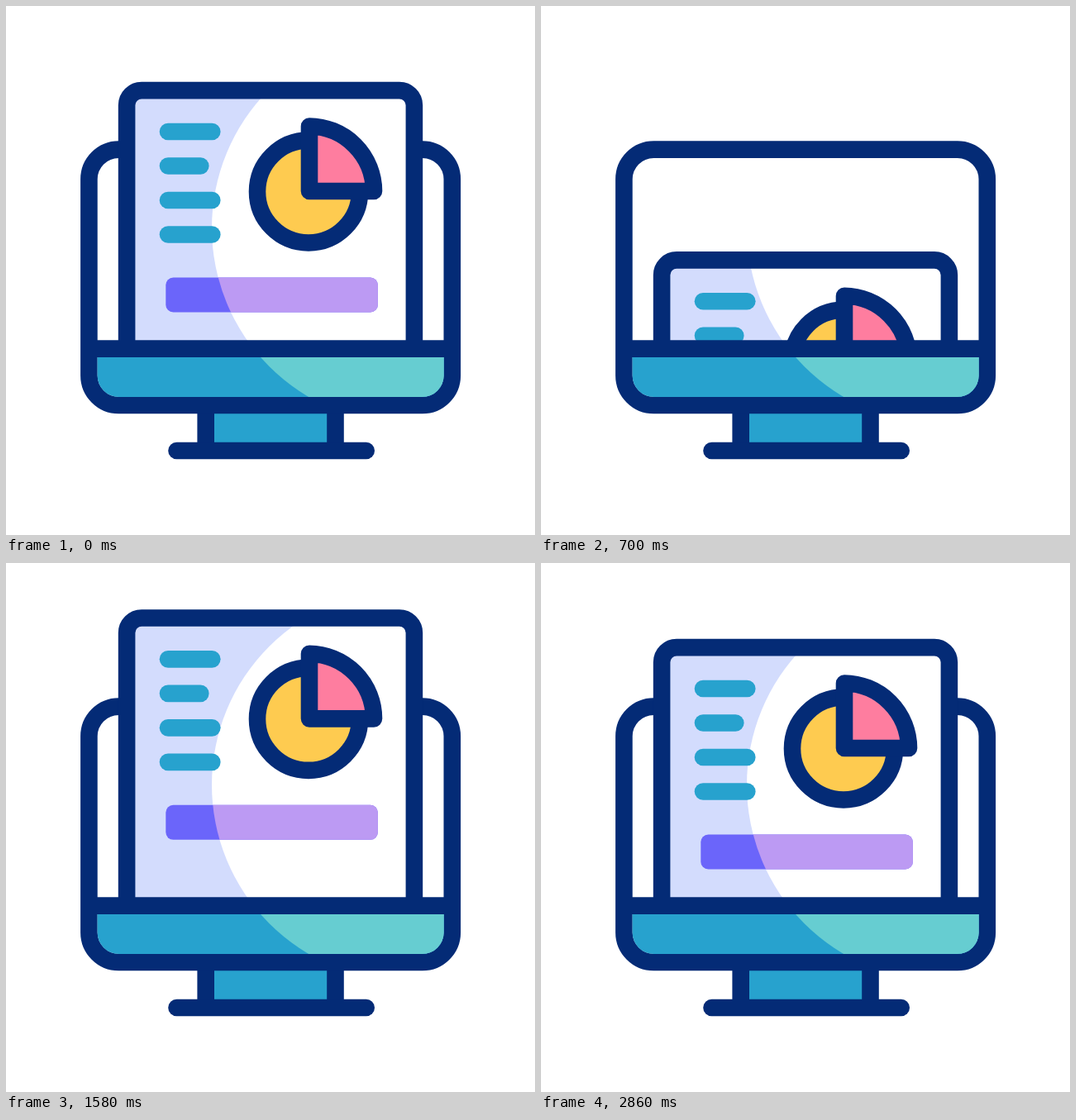
An HTML page with a canvas for the animation above (3240 ms loop, 640 by 640 pixels).

```html
<!DOCTYPE html>
<html lang="en">
<head>
<meta charset="utf-8">
<title>Report on a screen</title>
<style>
  html, body { margin: 0; width: 100%; height: 100%; overflow: hidden; background: #fff; }
  canvas { display: block; }
</style>
</head>
<body>
<canvas id="stage" width="640" height="640"></canvas>
<script>
const ctx = document.getElementById('stage').getContext('2d');
const LOOP = 3240;
const NAVY = '#042b76', TEAL = '#27a2ce', YELLOW = '#fecb50';
const PINK_RGB = [254, 125, 159], TEAL_RGB = [39, 162, 206];
const STROKE = 20.6;

// Eased value at time t; keys are [time, value] pairs
function track(t, keys) {
  if (t <= keys[0][0]) return keys[0][1];
  for (let i = 1; i < keys.length; i++) {
    const [t0, v0] = keys[i - 1], [t1, v1] = keys[i];
    if (t < t1) {
      const u = (t - t0) / (t1 - t0);
      return v0 + (v1 - v0) * u * u * (3 - 2 * u);
    }
  }
  return keys[keys.length - 1][1];
}

function box(x, y, w, h, radii) {
  const path = new Path2D();
  path.roundRect(x, y, w, h, radii);
  return path;
}

const glow = new Path2D();
glow.arc(486, 268.5, 237, 0, 2 * Math.PI);

// Fills a shape in two tones, split by the fixed glow circle
function fillSplit(path, dark, light) {
  ctx.fillStyle = dark;
  ctx.fill(path);
  ctx.save();
  ctx.clip(path);
  ctx.fillStyle = light;
  ctx.fill(glow);
  ctx.restore();
}

function outline(path, fill) {
  if (fill) {
    ctx.fillStyle = fill;
    ctx.fill(path);
  }
  ctx.strokeStyle = NAVY;
  ctx.stroke(path);
}

function line(x1, y1, x2, y2, color, cap = 'round') {
  ctx.lineCap = cap;
  ctx.strokeStyle = color;
  ctx.beginPath();
  ctx.moveTo(x1, y1);
  ctx.lineTo(x2, y2);
  ctx.stroke();
}

// y, right end, extra length of each text line
const textLines = [
  [152, 249.3, 23], [193.5, 235.3, 26.5], [235, 249.3, 16.5], [276.5, 249.3, 35]
];

function drawPie(t, dy) {
  const disc = new Path2D();
  disc.arc(366, 224.5 + dy, 62, 0, 2 * Math.PI);
  outline(disc, YELLOW);

  const mix = track(t, [[1580, 0], [1760, 1], [2480, 1], [2860, 0]]);
  const rgb = PINK_RGB.map((c, i) => Math.round(c + (TEAL_RGB[i] - c) * mix));
  const slice = new Path2D(
    `M367 ${224 + dy}V${145.5 + dy}A78.5 78.5 0 0 1 445 ${224 + dy}Z`);
  outline(slice, `rgb(${rgb})`);
}

function drawPage(t) {
  const dy = track(t, [
    [220, 0], [397, -39], [883, 318], [1616, -38], [1785, 10], [1940, 0]
  ]);
  ctx.save();
  ctx.beginPath();
  ctx.rect(0, 0, 640, 414);
  ctx.clip();

  const sheet = box(146.1, 102.1 + dy, 347.8, 500, 18);
  fillSplit(sheet, '#d3dcfd', '#fff');
  outline(sheet);

  textLines.forEach(([y, right, extra], i) => {
    const start = 1730 + 100 * i;
    const grow = track(t, [[start, 0], [start + 385, extra], [start + 770, 0]]);
    line(196, y + dy, right + grow, y + dy, TEAL);
  });
  fillSplit(box(193.3, 328.5 + dy, 256.6, 42, 9), '#6b65fa', '#bc9af3');
  drawPie(t, dy);
  ctx.restore();
}

function drawMonitor() {
  ctx.fillStyle = TEAL;
  ctx.fillRect(242, 483, 156, 55);
  line(241.7, 483, 241.7, 538, NAVY, 'butt');
  line(398.5, 483, 398.5, 538, NAVY, 'butt');
  line(206.5, 538, 435.7, 538, NAVY);
  outline(box(100.4, 173.6, 439.4, 309.4, 36), '#fff');
}

// Inner point, then outer point of each ray
const rays = [
  [508, 95, 505.4, 63.5], [545.5, 118, 568.3, 81.5], [581.5, 145, 609.3, 136.6]
];

function drawRays(t) {
  const tail = track(t, [[1840, 0], [2080, 1]]);
  const head = track(t, [[1600, 0], [1840, 1]]);
  if (head <= tail) return;
  for (const [x1, y1, x2, y2] of rays) {
    const dx = x2 - x1, dy = y2 - y1;
    line(x1 + dx * tail, y1 + dy * tail, x1 + dx * head, y1 + dy * head, YELLOW);
  }
}

function draw(now) {
  const t = now % LOOP;
  ctx.fillStyle = '#fff';
  ctx.fillRect(0, 0, 640, 640);
  ctx.lineWidth = STROKE;
  ctx.lineJoin = 'round';
  drawMonitor();
  drawPage(t);
  fillSplit(box(110.6, 414, 419, 59, [0, 0, 26, 26]), TEAL, '#66cdd1');
  line(100, 414.6, 540, 414.6, NAVY, 'butt');
  drawRays(t);
}

const begin = performance.now();
function tick() {
  draw(performance.now() - begin);
  requestAnimationFrame(tick);
}
tick();
</script>
</body>
</html>
```
